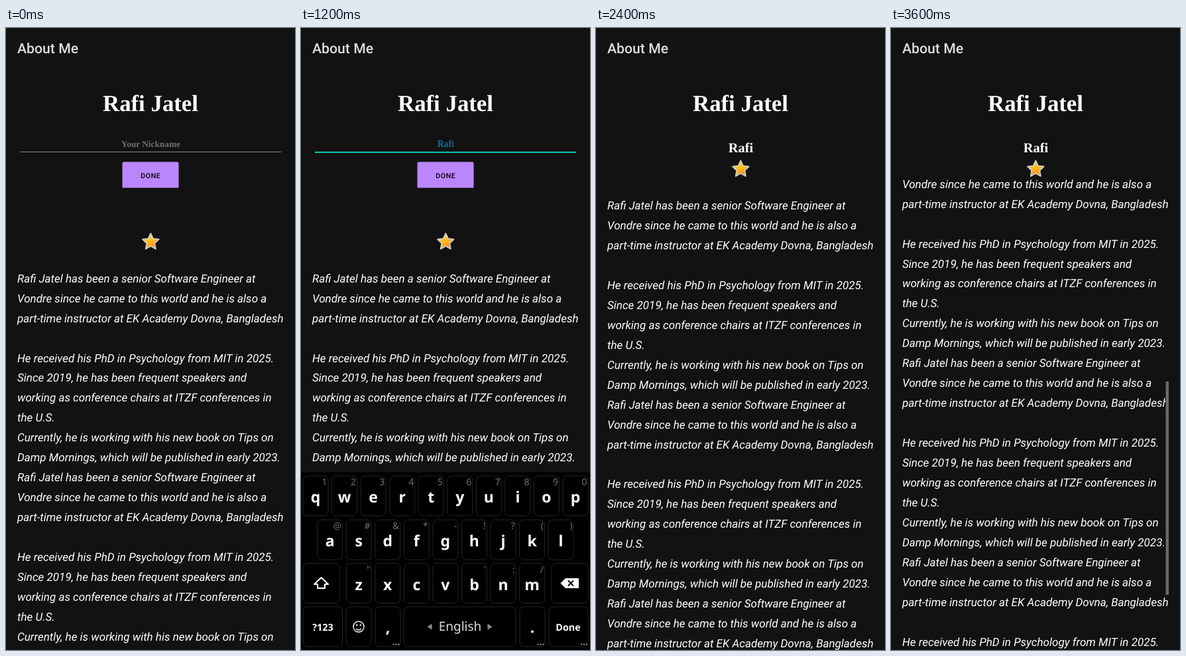
Animation of 436 by 936 pixels, one loop 4 s. Source, as an HTML page:

```html
<!DOCTYPE html>
<html lang="en">
<head>
<meta charset="utf-8">
<title>About Me</title>
<style>
  html, body { margin: 0; width: 100%; height: 100%; overflow: hidden; background: #121212; }
  svg { display: block; width: 436px; height: 936px; text-rendering: geometricPrecision; }
  .title { font: 500 21.2px Roboto, sans-serif; fill: #dedede; }
  .name { font: bold 34.8px "Liberation Serif", serif; fill: #fff; }
  .hint { font: bold 13.3px "Liberation Serif", serif; fill: #717171; }
  .entry { font: 14.8px "Liberation Serif", serif; fill: #0a95d3; }
  .nick { font: bold 20.4px "Liberation Serif", serif; fill: #fff; }
  .done { font: 500 10.6px Roboto, sans-serif; letter-spacing: .06em; fill: #000; }
  .bio { font: italic 17.05px Roboto, sans-serif; fill: #fff; }
  .mid { text-anchor: middle; }
  .key { fill: #000; stroke: #242424; stroke-width: 1; }
  .letter { font: 600 23px "Noto Sans", "Open Sans", sans-serif; fill: #fff; text-anchor: middle; }
  .alt { font: 14px "Noto Sans", "Open Sans", sans-serif; fill: #707070; text-anchor: end; }
  .word { font: bold 14.4px "Noto Sans", "Open Sans", sans-serif; fill: #fff; text-anchor: middle; }
  .lang { font: 19px "Noto Sans", "Open Sans", sans-serif; fill: #ddd; text-anchor: middle; }
</style>
</head>
<body>
<svg id="stage" viewBox="0 0 436 936">
  <defs>
    <linearGradient id="gold" x1=".3" y1="0" x2=".7" y2="1">
      <stop offset="0" stop-color="#ffdc3c"/>
      <stop offset=".5" stop-color="#ffb81a"/>
      <stop offset="1" stop-color="#f58200"/>
    </linearGradient>
    <clipPath id="view"><rect id="viewBox" width="436" height="936"/></clipPath>
  </defs>
  <rect width="436" height="936" fill="#121212"/>
  <text class="title" x="17" y="38">About Me</text>
  <text class="name mid" x="218" y="124.5">Rafi Jatel</text>

  <g id="form">
    <rect id="line" x="21" y="186" width="394"/>
    <text id="hint" class="hint mid" x="218.5" y="178.5">Your Nickname</text>
    <text id="entry" class="entry mid" x="218.5" y="179"></text>
    <rect id="caret" x="175" y="162.5" width="2" height="22" fill="#0cc5b4"/>
    <path id="button" d="M175.500 240.500V204q0-2.500 2.500-2.500h80q2.500 0 2.500 2.500V240.500z"/>
    <text class="done mid" x="218.3" y="226">DONE</text>
  </g>
  <text id="nick" class="nick mid" x="218.5" y="187">Rafi</text>

  <g clip-path="url(#view)"><g id="bio" class="bio"></g></g>
  <path id="star" fill="url(#gold)" stroke="#cfcac6" stroke-width="2" stroke-linejoin="round"/>
  <rect id="bar" x="414.5" width="4.500" height="321" fill="#6b6b6b"/>
  <g id="keyboard"></g>
</svg>
<script>
const STEP = 400;
const LINE = 29.96;
const VIEW_TOP = 227;
const BAR_RATIO = 0.4565;

const $ = id => document.getElementById(id);

function add(parent, tag, attrs, text) {
  const el = document.createElementNS("http://www.w3.org/2000/svg", tag);
  for (const k in attrs) el.setAttribute(k, attrs[k]);
  if (text) el.textContent = text;
  parent.appendChild(el);
  return el;
}

const set = (id, attrs) => {
  for (const k in attrs) $(id).setAttribute(k, attrs[k]);
};
const show = (id, on) => { $(id).style.display = on ? "" : "none"; };

const PARAGRAPHS = [
  "Rafi Jatel has been a senior Software Engineer at",
  "Vondre since he came to this world and he is also a",
  "part-time instructor at EK Academy Dovna, Bangladesh",
  "",
  "He received his PhD in Psychology from MIT in 2025.",
  "Since 2019, he has been frequent speakers and",
  "working as conference chairs at ITZF conferences in",
  "the U.S.",
  "Currently, he is working with his new book on Tips on",
  "Damp Mornings, which will be published in early 2023."
];

function buildBio() {
  for (let i = 0; i < 50; i++) {
    const text = PARAGRAPHS[i % PARAGRAPHS.length];
    if (text) add($("bio"), "text", { x: 17, y: i * LINE }, text);
  }
}

function buildStar() {
  const points = [];
  for (let i = 0; i < 10; i++) {
    const r = i % 2 ? 6.2 : 12.8;
    const a = i * Math.PI / 5 - Math.PI / 2;
    points.push((r * Math.cos(a)).toFixed(2) + " " + (r * Math.sin(a)).toFixed(2));
  }
  set("star", { d: "M" + points.join("L") + "z" });
}

function buildKeyboard() {
  const kb = $("keyboard");
  const pitch = 43.56;
  const key = (x, y, w) => add(kb, "rect", { class: "key", x, y, width: w, height: 60, rx: 6.5 });
  const label = (cls, x, y, s) => add(kb, "text", { class: cls, x, y }, s);
  const path = (d, attrs) => add(kb, "path", { d, ...attrs });

  add(kb, "rect", { y: 668.5, width: 436, height: 267.5, fill: "#000" });

  const rows = [
    ["qwertyuiop", "1234567890", 22, 674],
    ["asdfghjkl", "@#&*-!?()", 43.6, 740],
    ["zxcvbnm", "\"   ':/", 87.2, 805.5]
  ];
  for (const [letters, alts, left, y] of rows) {
    [...letters].forEach((c, i) => {
      const x = left + i * pitch;
      key(x - 19, y, 38);
      label("letter", x, y + 40, c);
      if (alts[i] !== " ") label("alt", x + 17.5, y + 14, alts[i]);
    });
  }

  // Shift and backspace
  key(3, 805.5, 55);
  path("M30.5 827L41 837H36V843H25V837H20z",
    { fill: "none", stroke: "#fff", "stroke-width": 2, "stroke-linejoin": "round" });
  key(378, 805.5, 55);
  path("M391.500 835.500L399 828H419V843H399z", { fill: "#fff" });
  path("M403 831.500l8 8m0-8l-8 8", { stroke: "#000", "stroke-width": 2 });

  // Bottom row
  const y = 871;
  for (const [x, w] of [[3, 59.5], [68, 38], [112, 38], [155, 169], [330, 38], [374, 59]]) key(x, y, w);
  label("word", 33, 907, "?123");
  label("word", 403, 906.5, "Done");
  label("letter", 131, 910, ",");
  label("letter", 349, 910, ".");
  label("lang", 240, 907, "English");
  path("M197.5 896.500v9l-7-4.500zM281.500 896.500v9l7-4.500z", { fill: "#8c8c8c" });
  add(kb, "circle", { cx: 87, cy: 901, r: 8, fill: "none", stroke: "#fff", "stroke-width": 1.4 });
  path("M83 904q4 4 8 0", { fill: "none", stroke: "#fff", "stroke-width": 1.4 });
  for (const x of [84.2, 89.8]) add(kb, "circle", { cx: x, cy: 898.5, r: 1.2, fill: "#fff" });
  for (const x of [138.5, 356.5, 422]) {
    path(`M${x} 927.5h10`, { stroke: "#8c8c8c", "stroke-width": 2, "stroke-dasharray": "2.4 1.4" });
  }
}

// One entry per step: form fields while editing, scroll offset afterwards
const STEPS = [
  { hint: true },
  { hint: true, caret: true, keys: true },
  { entry: "Ra", keys: true },
  { entry: "Rafi", keys: true },
  { entry: "Rafi", keys: true, pressed: true },
  { saved: true, scroll: 0, keys: true },
  { saved: true, scroll: 0 },
  { saved: true, scroll: 110, bar: true },
  { saved: true, scroll: 390, bar: true },
  { saved: true, scroll: 661.5, bar: true }
];

function render(s) {
  const scroll = s.scroll || 0;
  show("form", !s.saved);
  show("nick", s.saved);
  show("hint", s.hint);
  show("caret", s.caret);
  show("keyboard", s.keys);
  show("bar", s.bar);
  $("entry").textContent = s.entry || "";
  set("line", s.keys ? { height: 2, fill: "#0cc5b4" } : { height: 1, fill: "#8a8a8a" });
  set("button", { fill: s.pressed ? "#a779e2" : "#bb86fc" });
  set("star", { transform: `translate(218.3 ${s.saved ? 212.5 : 322})` });
  set("viewBox", { y: s.saved ? VIEW_TOP : 336 });
  set("bio", { transform: `translate(0 ${(s.saved ? 273 : 382.7) - scroll})` });
  set("bar", { y: 230 + scroll * BAR_RATIO });
}

buildBio();
buildStar();
buildKeyboard();

const start = performance.now();
let current = -1;
function tick() {
  const i = Math.floor((performance.now() - start) / STEP) % STEPS.length;
  if (i !== current) render(STEPS[current = i]);
  requestAnimationFrame(tick);
}
tick();
</script>
</body>
</html>
```
